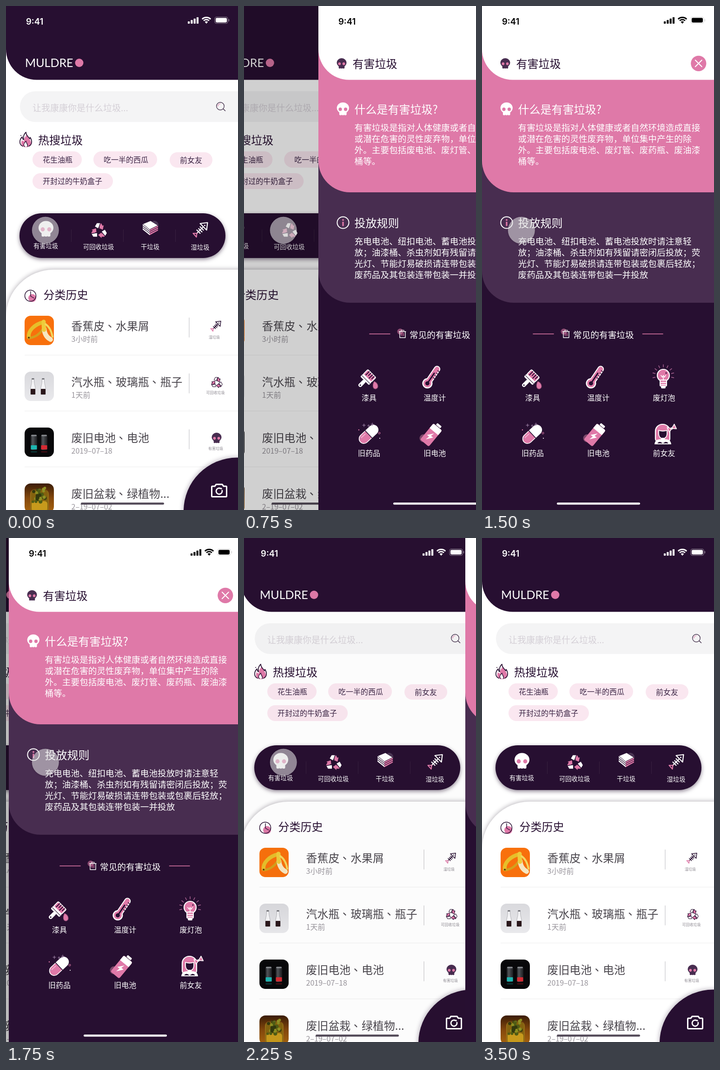
Write an HTML page with a canvas that moves like this. It is 499 px wide and 1082 px high and loops after 3.75 s.

```html
<!DOCTYPE html>
<html lang="zh-CN">
<head>
<meta charset="utf-8">
<title>垃圾分类</title>
<style>
html, body { margin: 0; width: 100%; height: 100%; overflow: hidden; background: #fff; }
canvas { display: block; width: 499px; height: 1082px; }
</style>
</head>
<body>
<canvas id="stage"></canvas>
<script>
const W = 499, H = 1082, LOOP = 3750, STEP = 250;
const DARK = '#270f31', PINK = '#df79a8', PLUM = '#482d50', WHITE = '#fff';
const SANS = '"Noto Sans CJK SC", "Noto Sans CJK", sans-serif';
const UI = 'Inter, "Noto Sans", sans-serif';

const canvas = document.getElementById('stage');
const c = canvas.getContext('2d');
const dpr = window.devicePixelRatio || 1;
canvas.width = W * dpr;
canvas.height = H * dpr;

// ---------- helpers ----------
function paint(fill, stroke, lw = 2) {
  if (fill) { c.fillStyle = fill; c.fill(); }
  if (stroke) { c.strokeStyle = stroke; c.lineWidth = lw; c.stroke(); }
}
function box(x, y, w, h, r, fill, stroke, lw) {
  c.beginPath();
  c.roundRect(x, y, w, h, r);
  paint(fill, stroke, lw);
}
function dot(x, y, r, fill, stroke, lw) {
  c.beginPath();
  c.arc(x, y, r, 0, Math.PI * 2);
  paint(fill, stroke, lw);
}
function trace(p, close) {
  c.beginPath();
  for (let i = 0; i < p.length; i += 2) c.lineTo(p[i], p[i + 1]);
  if (close) c.closePath();
}
function poly(p, fill, stroke, lw) { trace(p, true); paint(fill, stroke, lw); }
function line(p, stroke, lw) { trace(p, false); paint(null, stroke, lw); }
function shape(d, fill, stroke, lw) {
  const p = new Path2D(d);
  if (fill) { c.fillStyle = fill; c.fill(p); }
  if (stroke) { c.strokeStyle = stroke; c.lineWidth = lw; c.stroke(p); }
}
// y is the middle of the characters
function text(s, x, y, size, color, { weight = 400, font = SANS, align = 'left' } = {}) {
  c.font = `${weight} ${size}px ${font}`;
  c.textAlign = align;
  c.fillStyle = color;
  c.fillText(s, x, y + size * 0.38);
}
// full-width title whose commas sit in the middle of their cells
function title(s, x, y, size, color) {
  s.split('、').forEach((part, i) => {
    if (i) {
      text('、', x + size * 0.27, y - size * 0.27, size, color);
      x += size;
    }
    text(part, x, y, size, color);
    x += part.length * size;
  });
}
function at(x, y, scale, angle, draw) {
  c.save();
  c.translate(x, y);
  c.rotate(angle);
  c.scale(scale, scale);
  draw();
  c.restore();
}
function shadow(color, blur, dx, dy, draw) {
  c.save();
  c.shadowColor = color;
  c.shadowBlur = blur * dpr;
  c.shadowOffsetX = dx * dpr;
  c.shadowOffsetY = dy * dpr;
  draw();
  c.restore();
}

// ---------- shared icons ----------
function statusBar(color, rim) {
  text('9:41', 43, 33.2, 18.5, color, { weight: 600, font: UI });
  for (let i = 0; i < 4; i++) {
    const h = 5 + i * 3;
    box(391 + i * 6.3, 38 - h, 4.2, h, 1, color);
  }
  const a = Math.PI * 0.25;
  c.lineCap = 'butt';
  [8.3, 13].forEach(r => {
    c.beginPath();
    c.arc(431, 37.5, r, -Math.PI + a, -a);
    paint(null, color, 2.8);
  });
  c.beginPath();
  c.moveTo(431, 38);
  c.arc(431, 37.5, 4.8, -Math.PI + a, -a);
  c.closePath();
  paint(color);
  c.globalAlpha = rim;
  box(449, 23.5, 28, 14, 4, null, color, 1.2);
  box(478.6, 28, 1.6, 5, 0.8, color);
  c.globalAlpha = 1;
  box(451, 25.5, 24, 10, 2.4, color);
}
function skull(x, y, scale, color, eye) {
  at(x, y, scale, 0, () => {
    c.beginPath();
    c.ellipse(0, -2, 16, 14.5, 0, 0, Math.PI * 2);
    paint(color);
    for (let i = -1; i < 2; i++) box(i * 6.2 - 3.3, 5, 6.6, 12, 2.2, color);
    dot(-7, 1.5, 4.4, eye);
    dot(7, 1.5, 4.4, eye);
  });
}
function recycle(x, y, scale, edge) {
  for (let i = 0; i < 3; i++) at(x, y + 2 * scale, scale * 1.12, i * Math.PI * 2 / 3, () => {
    c.lineJoin = 'round';
    poly([-4, -15, 2, -15, -0.6, -7.5, -1.8, -5.2, -7.7, -8.6], WHITE, edge, 1.3);
    poly([3.5, -15, 4.6, -14, 7, -9.8, 9.2, -11.1, 7.3, -2.4, 0.1, -5.6, 1.6, -6.6, 0.9, -8.4], PINK, edge, 1.3);
  });
}
function fish(x, y, scale, color) {
  at(x, y, scale, 0, () => {
    c.lineJoin = c.lineCap = 'round';
    poly([15, -15, -1, -13, 13, 1], null, color, 2.2);
    dot(9, -9, 1.6, color);
    line([5, -5, -9, 9], color, 2.2);
    line([-1, -6, 6, 1], color, 2.2);
    line([-4, -2, 3, 5], color, 2.2);
    line([-8, 1, -1, 8], color, 2.2);
    poly([-8, 8, -16, 8, -9, 16], null, PINK, 2.2);
  });
}
function books() {
  dot(319, 470, 9, '#4b3654');
  c.lineJoin = 'round';
  poly([294, 468, 309, 480, 309, 492, 294, 480], WHITE);
  poly([309, 480, 327, 471, 327, 482, 309, 492], PINK);
  poly([294, 468, 311, 461, 327, 471, 309, 480], WHITE, DARK, 1);
  for (let i = 1; i < 3; i++) line([294, 468 + i * 4, 309, 480 + i * 4, 327, 471 + i * 4], DARK, 1.1);
}
function flame() {
  shape('M42 303C34 302 31 296 34 288C36 290 38 291 39 291C38 285 41 280 46 276C46 283 55 288 54 296C53 301 48 303 42 303Z', PINK);
  c.lineCap = c.lineJoin = 'round';
  shape('M36 301C27 297 29 286 35 281C35 284 36 286 38 287C37 280 39 274 43 271C43 279 49 281 51 285C51 284 52 283 52 282C57 290 56 298 49 301', null, DARK, 1.7);
  shape('M40 302C36 298 39 294 43 290C43 295 48 296 46 302', WHITE, DARK, 1.4);
  dot(32, 278, 1, DARK);
}

// ---------- list pictures, 63 x 63 ----------
function banana() {
  box(0, 0, 63, 63, 0, '#f8700c');
  c.lineCap = c.lineJoin = 'round';
  shape('M9 46C7 32 22 18 40 14', null, '#e6bf2a', 8);
  shape('M11 48C22 46 32 40 39 29', null, '#d3a01c', 5);
  shape('M42 28C43 40 48 47 56 51', null, '#f6e6c0', 10);
  shape('M41 13C41 19 41 24 42 30', null, '#eecb3a', 9);
  shape('M45 18C54 24 58 34 60 45', null, '#f2d75e', 4);
  dot(9, 47, 2, '#5a3a0c');
}
function bottles() {
  const g = c.createLinearGradient(0, 0, 0, 63);
  g.addColorStop(0, '#d9d9dd');
  g.addColorStop(1, '#e9e9ec');
  box(0, 0, 63, 63, 0, g);
  [18, 40].forEach(x => {
    shape(`M${x - 2} 15H${x + 2}L${x + 3} 25L${x + 5} 34V49H${x - 5}V34L${x - 3} 25Z`, '#f4f4f6', '#a3a3a8', 0.8);
    box(x - 2.5, 14, 5, 3, 0, '#77777c');
    box(x - 5, 37, 10, 12, 1, '#2a171b');
  });
}
function cans() {
  box(0, 0, 63, 63, 0, '#08080a');
  [[13, '#1db5b0'], [35, '#d52a32']].forEach(([x, hue]) => {
    const g = c.createLinearGradient(x, 0, x + 14, 0);
    g.addColorStop(0, '#1d1e21');
    g.addColorStop(0.3, '#53565b');
    g.addColorStop(1, '#1b1c1f');
    box(x, 17, 14, 31, 2, g);
    box(x + 0.5, 38, 13, 9, 1, hue);
    box(x + 1, 15.5, 12, 3, 1.5, '#8a8d92');
    box(x, 50, 14, 4, 2, hue + '33');
  });
}
function jar() {
  const g = c.createLinearGradient(0, 0, 0, 63);
  g.addColorStop(0, '#3a1c07');
  g.addColorStop(0.5, '#84480c');
  g.addColorStop(1, '#a8640e');
  box(0, 0, 63, 63, 0, g);
  box(12, 14, 40, 48, 9, '#84620f');
  box(15, 38, 34, 22, 6, '#c79a1c');
  let seed = 7;
  const rnd = () => (seed = seed * 16807 % 2147483647) / 2147483647;
  for (let i = 0; i < 24; i++)
    dot(18 + rnd() * 28, 8 + rnd() * 34, 2 + rnd() * 2.5, ['#4f5c14', '#8c8f22', '#33390d'][i % 3]);
  box(13, 13, 38, 48, 8, null, '#d8a94055', 1.2);
}

// ---------- home ----------
const rows = [
  ['香蕉皮、水果屑', '3小时前', banana],
  ['汽水瓶、玻璃瓶、瓶子', '1天前', bottles],
  ['废旧电池、电池', '2019–07–18', cans],
  ['废旧盆栽、绿植物...', '2–19–07–02', jar]
];
function hotPill(s, x, y, w, h) {
  box(x, y, w, h, h / 2, '#fae7f0');
  text(s, x + 22, y + h / 2 + 0.3, 16, '#3b2545');
}
function home() {
  box(0, 0, 700, H, 0, WHITE);
  box(0, 0, 700, 158.5, [0, 0, 0, 66], DARK);
  statusBar(WHITE, 0.45);
  text('MULDRE', 41, 121.8, 25, WHITE, { font: 'Lato, sans-serif' });
  dot(157.5, 122, 9, PINK);

  box(30, 183, 600, 66, 33, '#f4f4f5');
  text('让我康康你是什么垃圾...', 57, 218.5, 19, '#d5d0d7', { weight: 300 });
  c.lineCap = 'round';
  dot(461, 215, 8.3, null, '#4b3953', 1.4);
  line([467.4, 221.2, 471.5, 225], '#4b3953', 1.6);
  c.beginPath();
  c.arc(461, 215, 5.2, Math.PI, Math.PI * 1.5);
  paint(null, PINK, 1.1);

  flame();
  text('热搜垃圾', 69, 287.5, 24, DARK);
  hotPill('花生油瓶', 57, 312, 106, 35);
  hotPill('吃一半的西瓜', 188, 312, 137, 35);
  hotPill('前女友', 352, 314, 92, 33);
  hotPill('开封过的牛奶盒子', 57, 359, 173, 34);

  shadow('rgba(30,10,40,.5)', 8, 0, 3, () => box(29, 445, 443, 96, 48, DARK));
  [140.5, 252.5, 364.5].forEach(x => line([x, 480, x, 506], '#38213f', 1));
  skull(86, 478, 1, WHITE, PINK);
  recycle(200, 481, 1);
  books();
  fish(418.5, 480, 1, WHITE);
  [['有害垃圾', 85.5, 515.3], ['可回收垃圾', 199, 516.5], ['干垃圾', 310, 517], ['湿垃圾', 417.5, 517.5]]
    .forEach(([s, x, y]) => text(s, x, y, 13.3, WHITE, { align: 'center' }));

  shadow('rgba(60,50,65,.3)', 9, -1, -2, () => box(0, 566, 700, 700, [102, 0, 0, 0], WHITE));
  dot(56.5, 627, 8.5, PINK);
  dot(52.5, 622, 12, null, DARK, 1.5);
  c.lineJoin = 'round';
  line([53, 613, 53, 623, 60, 627], DARK, 1.4);
  text('分类历史', 80.5, 620, 24, DARK);

  rows.forEach(([name, when, picture], i) => {
    const y = 665 + i * 120;
    c.save();
    c.beginPath();
    c.roundRect(40, y, 63, 63, 13);
    c.clip();
    c.translate(40, y);
    picture();
    c.restore();
    title(name, 140.5, y + 21.5, 23.9, '#4a464d');
    text(when, 140.5, y + 49.5, 16, '#98949b', { weight: 300 });
    line([40, y + 84.5, 700, y + 84.5], '#ededee', 1);
    if (i < 3) line([394, y + 4.5, 394, y + 46], '#d6d5d8', 1.6);
  });
  fish(451.5, 687, 0.7, DARK);
  recycle(453.5, 807.5, 0.7, DARK);
  skull(453, 927, 0.66, PLUM, PINK);
  [['湿垃圾', 448, 711], ['可回收垃圾', 450.5, 830], ['有害垃圾', 451, 949.5]]
    .forEach(([s, x, y]) => text(s, x, y, 8, '#8e8a92', { align: 'center' }));

  shadow('rgba(40,20,50,.25)', 9, -2, -2, () => box(382, 969.5, 400, 300, [115, 0, 0, 0], DARK));
  c.lineJoin = 'round';
  shape('M444 1031H449L452 1027H465L468 1031H473Q474.5 1031 474.5 1032.5V1052Q474.5 1053.5 473 1053.5H444Q442.5 1053.5 442.5 1052V1032.5Q442.5 1031 444 1031Z', null, WHITE, 3);
  c.beginPath();
  c.arc(458.5, 1041.5, 6.5, -0.2, Math.PI * 1.65);
  paint(null, WHITE, 2.8);
  dot(463, 1036, 1.7, WHITE);
  box(161, 1066, 179, 4.4, 2.2, '#564d5b');
}

// ---------- detail ----------
function brush() {
  at(105, 799, 1, Math.PI / 4, () => {
    box(-12, -14, 24, 14, 2, PINK, WHITE, 2);
    [-7, -2, 3, 8].forEach((x, i) => line([x, -13, x, i % 2 ? -6 : -3], DARK, 2));
    box(-13, 0, 26, 8, 2, WHITE);
    line([-12, 4, 12, 4], DARK, 1);
    box(-4, 7, 8, 18, 4, WHITE);
    dot(0, 21, 1.6, DARK);
  });
  shape('M120 806C128 809 131 819 124 822C116 823 116 813 120 806Z', PINK, '#8f4a72', 1.2);
}
function thermometer() {
  at(244, 796, 1, Math.PI * 0.19, () => {
    box(-7, -27, 14, 45, 7, WHITE);
    dot(0, 17, 11, WHITE);
    box(-5, -25, 10, 42, 5, PINK);
    dot(0, 17, 8.5, PINK);
    line([0, -9, 0, 16], DARK, 3);
    dot(0, 17, 4.5, DARK);
    for (let i = 0; i < 4; i++) line([3, -18 + i * 6, 7, -18 + i * 6], DARK, 1.4);
  });
}
function bulb() {
  for (let i = 0; i < 9; i++) {
    const a = Math.PI * (0.93 + i * 0.1425), u = Math.cos(a), v = Math.sin(a);
    line([390 + u * 18, 793 + v * 18, 390 + u * 23, 793 + v * 23], '#ad6594', 1.5);
  }
  dot(390, 793, 13, PINK, WHITE, 2.2);
  box(383, 803, 14, 13, 2, PINK, WHITE, 2);
  line([384, 808, 396, 808], WHITE, 1.8);
  line([384, 812.5, 396, 812.5], WHITE, 1.8);
  box(385, 816, 10, 5, 2.5, WHITE);
  line([385, 793, 388, 797, 390, 793, 392, 797, 395, 793], WHITE, 1.6);
  line([390, 797, 390, 804], WHITE, 1.6);
  dot(396, 788, 1.4, DARK);
}
function pill() {
  at(108, 919.5, 1, Math.PI * 0.76, () => {
    box(-25, -11, 50, 22, 11, WHITE);
    box(-23, -9.5, 23, 19, [9.5, 0, 0, 9.5], WHITE);
    box(0, -9.5, 23.5, 19, [0, 9.5, 9.5, 0], PINK);
    line([0, -11, 0, 11], DARK, 1.6);
    line([5, 5.5, 16, 5.5], '#f0b2cf', 2);
  });
  [[98, 900], [116, 898]].forEach(([x, y]) => {
    line([x - 3, y, x + 3, y], '#a88bb0', 1.1);
    line([x, y - 3, x, y + 3], '#a88bb0', 1.1);
  });
  dot(108, 901, 1.6, null, '#a88bb0', 1);
  dot(131, 917, 2, null, PINK, 1);
  dot(87, 910, 1.2, PINK);
  dot(90, 928, 1.3, '#a88bb0');
  dot(132, 928, 1.1, WHITE);
}
function battery() {
  dot(226, 928, 8.5, '#7b4668');
  at(244, 919, 1, Math.PI * 0.22, () => {
    box(-12, -20, 24, 45, 3.5, PINK);
    box(-12, -20, 24, 13, [3.5, 3.5, 0, 0], WHITE);
    box(-6, -26, 12, 5, 1.5, WHITE);
    poly([3, -4, -7, 8, -1, 8, -3, 17, 7, 4, 1, 4], WHITE);
  });
}
function girl() {
  box(373, 898, 31, 37, [15, 15, 6, 6], PINK, WHITE, 2.2);
  shape('M371 941Q372 930 384 930H394Q406 930 407 941Z', WHITE);
  shape('M380 911Q389 914 398 911V919Q397 928 389 929Q381 928 380 919Z', DARK, WHITE, 1.8);
  box(385, 927, 8, 7, 2, WHITE);
  shape('M377 939Q380 935 384 936L389 939L394 936Q398 935 401 939Z', DARK);
  at(408, 907, 1, -0.45, () => {
    poly([0, 0, -8, -6, -8, 5], PINK, WHITE, 1.6);
    poly([0, 0, 9, -6, 9, 5], PINK, WHITE, 1.6);
    dot(0, 0, 2.4, WHITE);
  });
}
const what = ['有害垃圾是指对人体健康或者自然环境造成直接', '或潜在危害的灵性废弃物，单位集中产生的除',
  '外。主要包括废电池、废灯管、废药瓶、废油漆', '桶等。'];
const rules = ['充电电池、纽扣电池、蓄电池投放时请注意轻', '放；油漆桶、杀虫剂如有残留请密闭后投放；荧',
  '光灯、节能灯易破损请连带包装或包裹后轻放；', '废药品及其包装连带包装一并投放'];
const items = [['漆具', brush], ['温度计', thermometer], ['废灯泡', bulb],
  ['旧药品', pill], ['旧电池', battery], ['前女友', girl]];

function detail() {
  box(0, 0, W, H, 0, DARK);
  box(0, 0, W, 637, [0, 0, 0, 68], PLUM);
  box(0, 0, W, 400, [0, 0, 0, 68], PINK);
  box(0, 0, W, 158.5, [0, 0, 0, 66], WHITE);
  statusBar('#000', 0.15);
  skull(50, 123, 0.66, PLUM, PINK);
  text('有害垃圾', 73.5, 123.5, 24, DARK);
  c.lineCap = c.lineJoin = 'round';
  dot(465.8, 123.3, 16.6, PINK);
  line([458.8, 116.3, 472.8, 130.3], WHITE, 2);
  line([472.8, 116.3, 458.8, 130.3], WHITE, 2);

  skull(52.8, 220.5, 0.82, WHITE, PINK);
  text('什么是有害垃圾?', 77.5, 222, 24, WHITE, { weight: 300 });
  what.forEach((s, i) => text(s, 77.5, 261 + i * 24, 18.67, WHITE, { weight: 300 }));

  dot(53, 465, 12.6, null, WHITE, 2);
  dot(53, 459.3, 1.9, PINK);
  box(51.4, 463, 3.2, 9.5, 1.2, PINK);
  text('投放规则', 77.5, 465.5, 24, WHITE);
  rules.forEach((s, i) => text(s, 77.5, 505 + i * 24, 18.67, WHITE));

  line([110, 704, 154, 704], PINK, 1.6);
  line([345.5, 704, 389, 704], PINK, 1.6);
  dot(176, 699, 6.5, '#8c4a72');
  line([173.5, 699, 188, 699], WHITE, 1.4);
  line([178, 698, 178, 696, 184, 696, 184, 698], WHITE, 1.2);
  line([175, 699, 175, 712, 187, 712, 187, 699], WHITE, 1.4);
  [178.5, 181, 183.5].forEach(x => line([x, 702, x, 708], PINK, 1.1));
  text('常见的有害垃圾', 196, 706, 18.67, WHITE);

  items.forEach(([s, icon], i) => {
    c.lineCap = c.lineJoin = 'round';
    icon();
    text(s, 109 + (i % 3) * 141.3, i < 3 ? 841 : 959.5, 16, WHITE, { align: 'center' });
  });
  box(161, 1066, 179, 4.4, 2.2, WHITE);
}

// ---------- motion ----------
// left edge of the detail page at each step; it rests off stage afterwards
const slide = [W, W, 438, 160, 1, 0, 0, 6, 191, 476];
const TOUCH_END = 2750;

function draw(t) {
  const step = Math.floor(t / STEP);
  const edge = slide[step] ?? W;
  const open = W - edge;

  c.setTransform(dpr, 0, 0, dpr, 0, 0);
  c.save();
  c.translate(-open * 0.3, 0);
  home();
  c.restore();

  if (open) {
    c.fillStyle = `rgba(0,0,0,${0.27 * open / W})`;
    c.fillRect(0, 0, W, H);
    c.save();
    c.translate(edge, 0);
    detail();
    c.restore();
  }
  if (t < TOUCH_END) {
    shadow('rgba(0,0,0,.25)', 5, 0, 1, () =>
      dot(84.8, 481.5, 28.7, 'rgba(255,255,255,.5)', 'rgba(255,255,255,.2)', 1));
  }
}

const start = performance.now();
function tick(now) {
  draw(Math.max(0, now - start) % LOOP);
  requestAnimationFrame(tick);
}
draw(0);
requestAnimationFrame(tick);
</script>
</body>
</html>
```
